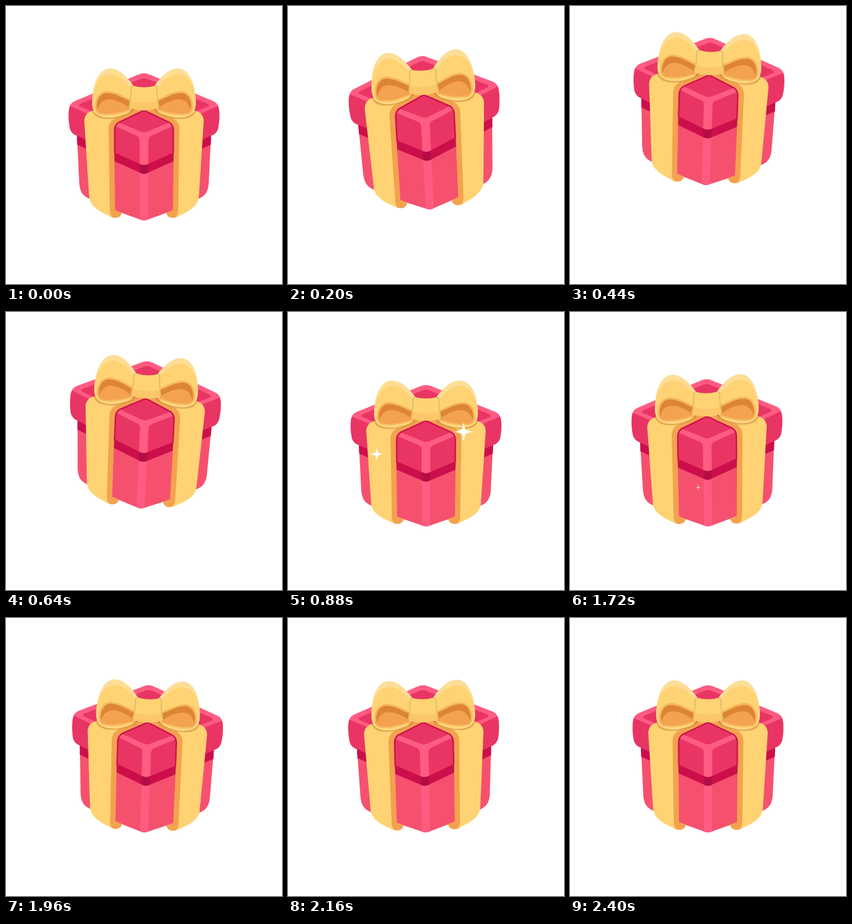
Recreate the animation shown at these times as an HTML page. Size 448x450 px, loop 2.44 s.

```html
<!DOCTYPE html>
<html lang="en">
<head>
<meta charset="utf-8">
<title>Gift box</title>
<style>
  html, body { margin: 0; width: 100%; height: 100%; overflow: hidden; background: #fff; }
  svg { display: block; width: 100vw; height: 100vh; }
  .red { fill: #e93563; }
  .body { fill: #f5516f; }
  .pink { fill: #ff5c82; }
  .wine { fill: #cc0f4b; }
  .gold { fill: #ffd373; }
  .pale { fill: #fcde97; }
  .amber { fill: #f3a24f; }
  .rust { fill: #de8435; }
  .line { fill: none; stroke-linecap: round; stroke-linejoin: round; }
</style>
</head>
<body>
<svg viewBox="0 0 448 450">
  <defs>
    <g id="ribbon">
      <path class="amber" d="M216 164 L222 169 L186 186 Q176 190 175.500 200 L177 330 L188 335 Q186 343 177 343 Q168 342 164 336 L160 190 Z"/>
      <path class="gold" d="M150 169 Q129 168 127 185 L135 309 Q136 318 142 324 Q153 335 174 342 Q168.500 339 168.500 331 L166.500 200 Q166.500 186 179 181 L203 172 Z"/>
      <path class="line" stroke="#cc0f4b" stroke-width="2.2" d="M224 169 L187 186.500 Q177 190 176.500 200 L176.500 238"/>
    </g>
    <g id="loop">
      <path class="line" stroke="#d9963c" stroke-opacity=".65" stroke-width="6" d="M143 170 C147 182 172 184 203 171"/>
      <path class="pale" d="M207 129 C196 114 184 101 168 101 C152 102 143 122 141 141 C139 156 139 165 144 172 C150 180 168 183 184 178 C196 175 200 172 206 166 Z"/>
      <path class="gold" d="M142 139 C147 121 156 110 170 110 C184 111 194 122 206 135 L206 166 C200 171 196 174 184 177 C168 181 152 179 146 172 C141 166 140 154 142 139 Z"/>
      <path class="rust" stroke="#f7b75c" stroke-width="3" d="M146 165 C145 152 151 140 163 139 C178 139 190 148 203 153 L202 167 C186 173 168 177 152 174 Q147 172 146 165 Z"/>
      <path class="amber" d="M148 169 C151 157 158 151 168 151 C180 152 192 158 202 166 C186 172 168 176 153 173 Q149 172 148 169 Z"/>
    </g>
  </defs>
  <g id="gift">
    <path class="body" d="M115 206 L119 288 Q120 304 131 310 L177 331 L216 345 Q224 349 232 345 L271 331 L317 310 Q328 304 329 288 L333 206 Z"/>
    <path class="pink" d="M217.500 260 H230.500 V345.500 Q224 349 217.500 345.500 Z"/>
    <path class="wine" d="M115 206 H333 L332.500 224.500 L230 270 Q224 273 218 270 L115.500 224.500 Z"/>
    <path fill="#b30d45" d="M217.500 250 H230.500 V270 Q224 273 217.500 270 Z"/>
    <path class="red" d="M214 111.500 Q224 106.500 234 111.500 L336 154 Q345 158 346 168 Q347.500 182 344.500 198 Q342 207 333 210 L230 256 Q224 259 218 256 L115 210 Q106 207 103.500 198 Q100.500 182 102 168 Q103 158 112 154 Z"/>
    <path class="pink" d="M214 111.500 Q224 106.500 234 111.500 L336 154 Q342 156 344 162 L236 210 Q231 212 231 218 V255.500 Q224 259 217 255.500 V218 Q217 212 212 210 L104 162 Q106 156 112 154 Z"/>
    <path class="red" d="M218 118 Q224 115 230 118 L327 158 Q332 161 327 163 L230 203 Q224 206 218 203 L121 163 Q116 161 121 158 Z"/>
    <use href="#ribbon"/>
    <use href="#ribbon" transform="matrix(-1 0 0 1 448 0)"/>
    <use href="#loop"/>
    <use href="#loop" transform="matrix(-1 0 0 1 448 0)"/>
    <path class="gold" d="M206 129 Q224 134 242 129 Q245.500 130 245 135 Q245 150 248 163 Q247 167 243 167 Q224 171 205 167 Q201 167 200 163 Q203 150 203 135 Q202.500 130 206 129 Z"/>
    <path fill="#fbc768" d="M202 154 Q224 159 246 154 L248 163 Q247 167 243 167 Q224 171 205 167 Q201 167 200 163 Z"/>
    <path class="line" stroke="#dfbd70" stroke-width="2" d="M206 129 Q202.500 130 203 135 Q203 150 200 163 M242 129 Q245.500 130 245 135 Q245 150 248 163"/>
  </g>
  <path id="stars" fill="#fff"/>
</svg>
<script>
  const LOOP = 2440, STEP = 40, SHINE = 590;
  const gift = document.getElementById('gift');
  const stars = document.getElementById('stars');

  // x, y, radius, start
  const sparkles = [
    [285, 194, 16, 692],
    [144, 230, 11, 730],
    [226, 156, 16, 980],
    [297, 242, 16, 1040],
    [208, 284, 11, 1150]
  ];

  // A sine wave that runs for some cycles and rests at 0 otherwise
  function swing(t, start, period, cycles = 1) {
    const p = (t - start) / period;
    return p > 0 && p < cycles ? Math.sin(2 * Math.PI * p) : 0;
  }

  // A leap with its top at 400 ms
  function lift(t) {
    const p = (t - 400) / (t < 400 ? 240 : 340);
    return -58 * Math.max(0, 1 - p * p);
  }

  const tilt = t => -6.5 * swing(t, 160, 515);
  const wobble = t => 3.65 * swing(t, 1496, 426, 2);

  // Crouch before the leap, then a fading bounce after landing
  function stretch(t) {
    const fade = Math.exp((750 - t) / 870);
    return 1 - .06 * swing(t, 0, 320) - .047 * fade * swing(t, 750, 600);
  }

  // Four concave points, each drawn from tip to notch to tip
  function star([x, y, r, start], t) {
    const p = (t - start) / SHINE;
    if (p <= 0 || p >= 1) return '';
    const s = Math.min(1, 1.6 * Math.sin(Math.PI * p));
    const arm = r * s ** .25, c = .2 * r * s + .2;
    let d = '';
    for (let i = 0; i < 4; i++) {
      const cos = Math.round(Math.cos(i * Math.PI / 2));
      const sin = Math.round(Math.sin(i * Math.PI / 2));
      const at = (u, v) => `${x + u * cos - v * sin} ${y + u * sin + v * cos}`;
      d += `${i ? 'L' : 'M'}${at(0, -arm)}Q${at(c * .5, -c * 1.6)} ${at(c, -c)}` +
        `Q${at(c * 1.6, -c * .5)} ${at(arm, 0)}`;
    }
    return d + 'Z';
  }

  function draw(now) {
    const t = Math.floor(now % LOOP / STEP) * STEP;
    gift.setAttribute('transform',
      `translate(0 ${lift(t)}) rotate(${tilt(t)} 224 228) rotate(${wobble(t)} 224 347) ` +
      `translate(0 347) scale(1 ${stretch(t)}) translate(0 -347)`);
    stars.setAttribute('d', sparkles.map(s => star(s, t)).join(''));
  }

  const begin = performance.now();
  function tick() {
    draw(performance.now() - begin);
    requestAnimationFrame(tick);
  }
  tick();
</script>
</body>
</html>
```
